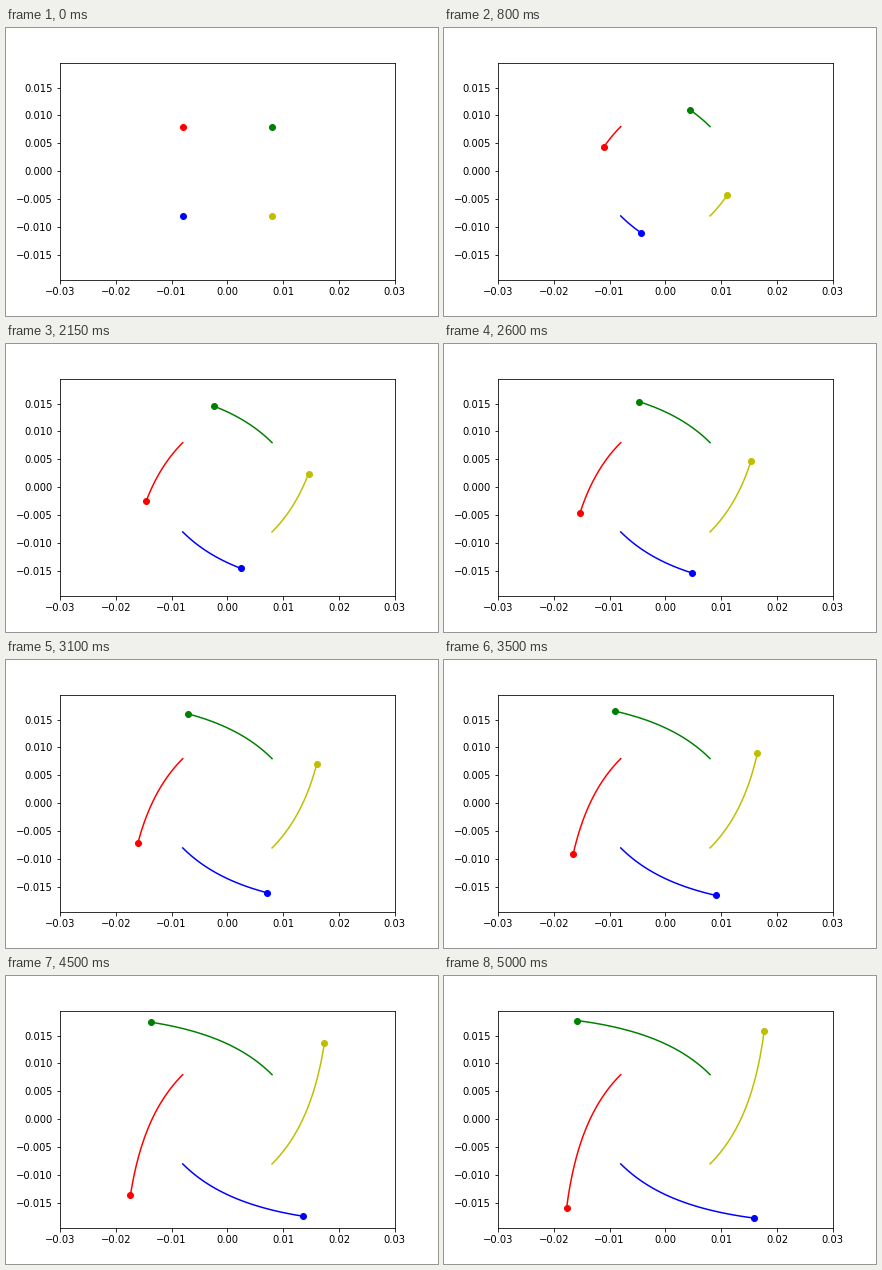
A matplotlib script that plays this animation: 432 by 288 pixels, repeating every 5050 ms.

```python
import numpy as np
import matplotlib.pyplot as plt
from matplotlib.animation import FuncAnimation

FRAMES = 101
SUBSTEPS = 40
START = 0.008        # half the side of the starting square
SPEED = 2.131e-4     # tangential velocity component per frame
PULL = 4.579e-10     # inverse-square attraction toward the centre


def accel(p):
    return -PULL * p / np.hypot(*p) ** 3


def orbit():
    """Leapfrog path of the upper-left body, one point per frame."""
    p = np.array([-START, START])
    v = np.array([-SPEED, -SPEED])
    dt = 1 / SUBSTEPS
    path = [p.copy()]
    for _ in range(FRAMES - 1):
        for _ in range(SUBSTEPS):
            v = v + accel(p) * dt / 2
            p = p + v * dt
            v = v + accel(p) * dt / 2
        path.append(p.copy())
    return np.array(path).T


x, y = orbit()
# the same path turned by quarter circles
paths = {"r": (x, y), "b": (-y, x), "y": (-x, -y), "g": (y, -x)}

fig = plt.figure(figsize=(6, 4), dpi=72, facecolor="white")
ax = fig.add_axes([0.125, 0.125, 0.775, 0.755])
ax.set_xlim(-0.03, 0.03)
half = 0.03 * (0.755 * 4) / (0.775 * 6)
ax.set_ylim(-half, half)
ax.set_xticks(np.arange(-3, 4) * 0.01)
ax.set_yticks(np.arange(-3, 4) * 0.005)

trails = {c: ax.plot([], [], color=c, lw=1.5)[0] for c in paths}
bodies = {c: ax.plot([], [], "o", color=c, ms=6)[0] for c in paths}


def update(i):
    for c, (px, py) in paths.items():
        trails[c].set_data(px[:i + 1], py[:i + 1])
        bodies[c].set_data([px[i]], [py[i]])
    return [*trails.values(), *bodies.values()]


def init():
    return update(0)


anim = FuncAnimation(fig, update, frames=FRAMES, init_func=init,
                     interval=50, repeat=True, repeat_delay=0, blit=False)
plt.show()
```
